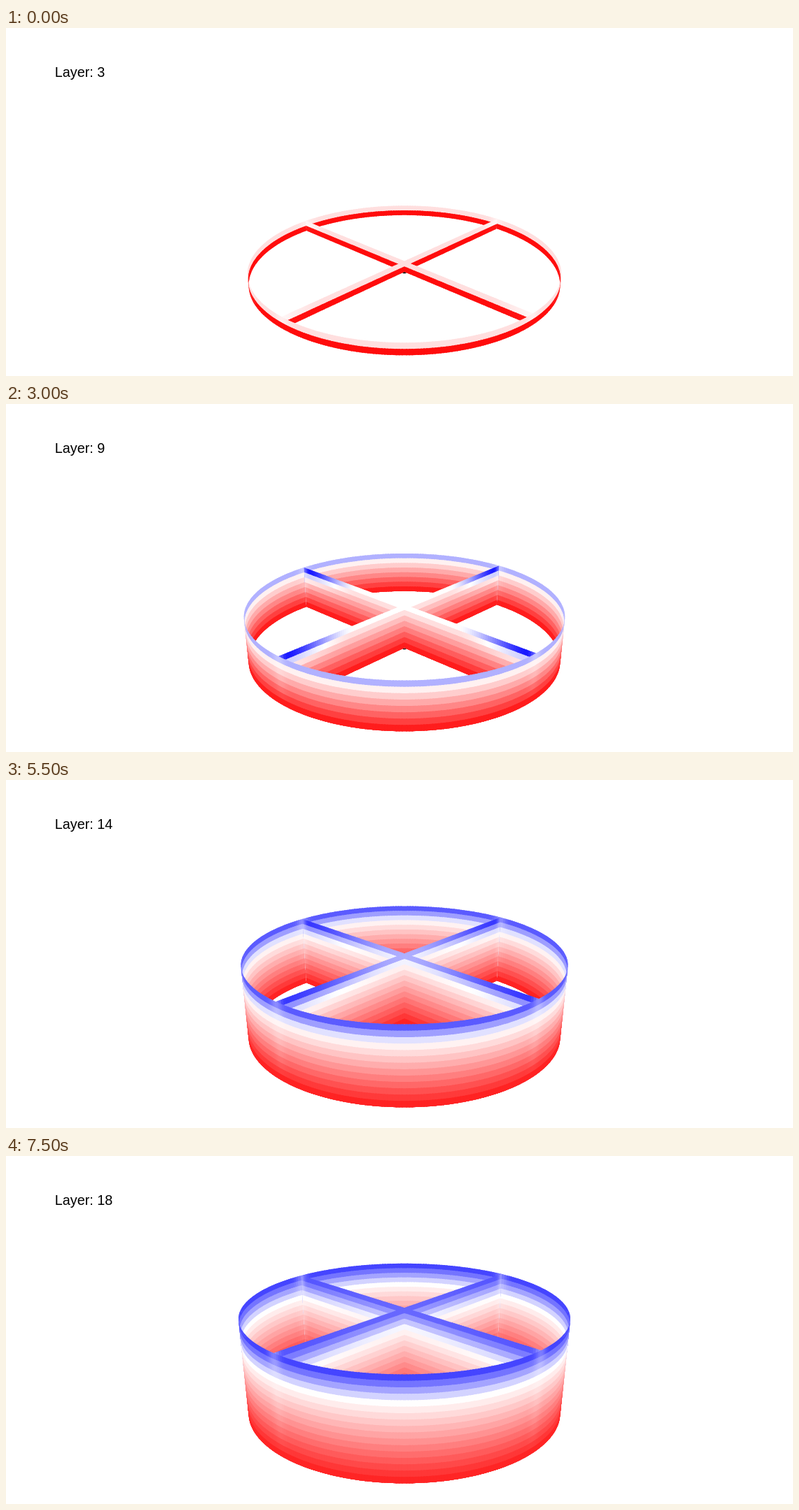
An HTML page with a canvas that plays this animation: 1124 px wide and 498 px high, repeating every 8000 ms.

```html
<!DOCTYPE html>
<html lang="en">
<head>
<meta charset="utf-8">
<title>Layer build-up</title>
<style>
  html, body { margin: 0; width: 100%; height: 100%; overflow: hidden; background: #fff; }
  canvas, svg { position: absolute; left: 0; top: 0; width: 1124px; height: 498px; }
  text { font: 19.8px "Liberation Sans", Arial, sans-serif; fill: #000; }
</style>
</head>
<body>
<canvas id="stage" width="1124" height="498"></canvas>
<svg viewBox="0 0 1124 498"><text id="label" x="69.8" y="70">Layer: 3</text></svg>
<script>
const ctx = document.getElementById('stage').getContext('2d');
const label = document.getElementById('label');

const STEP = 500, STEPS = 16, FIRST = 3;

// Camera: distance 1 from the centre of the base, tilted down.
const CX = 569, CY = 349, FOCAL = 1031, SIN = 0.4425, COS = 0.897;
const RADIUS = 0.2118, BAND = 0.00789;
const SIDE = 1.76;                       // angle where the ring turns its outer face
const ARM_LEFT = 0.81, ARM_RIGHT = 0.757; // back arms, measured from the back

const clamp = (v, lo, hi) => Math.min(hi, Math.max(lo, v));
const smooth = v => { v = clamp(v, 0, 1); return v * v * (3 - 2 * v); };
const bell = (v, width) => Math.exp(-((v / width) ** 2));

function project(x, y, z) {
  const k = FOCAL / (1 - z * COS - y * SIN);
  return [CX + x * k, CY + (z * SIN - y * COS) * k];
}

const level = j => BAND * (j + 0.0035 * j * (17 - j));

// Stress from -1 (blue) over 0 (white) to 1 (red)
function colour(s) {
  const v = Math.round(255 * (1 - Math.min(1, Math.abs(s))));
  return s > 0 ? `rgb(255,${v},${v})` : `rgb(${v},${v},255)`;
}

function stressModel(n) {
  const rimDepth = Math.max(0.37 * (n - 6.4), -0.15);
  const bottom = 0.84 + 0.15 * Math.exp(-n / 7);
  const rim = n > 6 ? -0.78 * (1 - Math.exp((6 - n) / 4)) : 0;
  const hub = (8.5 - n) * (n < 8.5 ? 0.02 : 0.07);
  const end = n < 6 ? 0.05 - 0.2375 * (n - 2)
    : -0.95 + 0.032 * Math.max(0, n - 8) + 0.025 * Math.max(0, 8 - n);
  const fadeFrom = clamp(0.62 - 0.1 * (n - 6), 0, 0.7);

  // Blue fades to white at the neutral depth, then red grows to the base.
  function profile(d, top) {
    const neutral = rimDepth > 0 ? rimDepth * clamp(top / rim, 0, 1) : rimDepth;
    return d < neutral
      ? top * (1 - d / neutral)
      : bottom * (d - neutral) / (n - 1 - neutral);
  }
  const peak = end - profile(0, rim);
  const height = d => 1 - d / (n - 1);

  return {
    ring(d, a, side) {
      const back = side < 0 ? ARM_LEFT : ARM_RIGHT;
      const front = Math.PI - (side < 0 ? ARM_RIGHT : ARM_LEFT);
      const p = bell(a - back, 0.05) + bell(a - front, 0.05);
      const spot = n < 8 ? peak * 0.35 * 0.3 ** d * p : 0;
      return profile(d, rim) * (1 - 0.3 * p * height(d)) + spot;
    },
    arm(d, r) {
      const g = smooth((r - fadeFrom) / (1 - fadeFrom));
      const s = profile(d, hub + (rim - hub) * g) + peak * g * 0.4 ** d;
      return s * (1 - 0.4 * bell(1 - r, 0.035) * height(d));
    }
  };
}

// Upright wall along at(t), t from 0 to 1. Each band is laid over the one above
// and reaches down to the base; columns overlap, so no seams show.
function wall(n, cols, at, stress) {
  for (let d = 0; d < n; d++) {
    const h = level(n - d);
    for (let i = 0; i < cols; i++) {
      const [x0, z0] = at(i / cols);
      const [x1, z1] = at(Math.min(1, (i + 1.5) / cols));
      ctx.fillStyle = colour(stress(d, (i + 0.5) / cols));
      ctx.beginPath();
      ctx.moveTo(...project(x0, h, z0));
      ctx.lineTo(...project(x1, h, z1));
      ctx.lineTo(...project(x1, 0, z1));
      ctx.lineTo(...project(x0, 0, z0));
      ctx.fill();
    }
  }
}

function ringPart(n, model, from, to) {
  for (const side of [-1, 1]) {
    const angle = t => from + (to - from) * t;
    wall(n, 90,
      t => [side * RADIUS * Math.sin(angle(t)), -RADIUS * Math.cos(angle(t))],
      (d, t) => model.ring(d, angle(t), side));
  }
}

function arm(n, model, a, side, inward) {
  const x = side * RADIUS * Math.sin(a), z = -RADIUS * Math.cos(a);
  const reach = t => inward ? 1 - t : t;
  wall(n, 60, t => [x * reach(t), z * reach(t)], (d, t) => model.arm(d, reach(t)));
}

function draw(layer) {
  const n = layer - 1, model = stressModel(n);
  label.textContent = 'Layer: ' + layer;
  ctx.clearRect(0, 0, 1124, 498);

  ctx.fillStyle = '#000';
  ctx.beginPath();
  ctx.ellipse(CX, CY + 0.3, 3, 2, 0, 0, 2 * Math.PI);
  ctx.fill();

  ringPart(n, model, 0, SIDE);
  arm(n, model, ARM_LEFT, -1, true);
  arm(n, model, ARM_RIGHT, 1, true);
  arm(n, model, Math.PI - ARM_RIGHT, -1, false);
  arm(n, model, Math.PI - ARM_LEFT, 1, false);
  ringPart(n, model, SIDE, Math.PI);
}

const start = performance.now();
let shown = 0;
function tick() {
  const t = Math.max(0, performance.now() - start);
  const layer = FIRST + Math.floor(t / STEP) % STEPS;
  if (layer !== shown) draw(shown = layer);
  requestAnimationFrame(tick);
}
tick();
</script>
</body>
</html>
```
